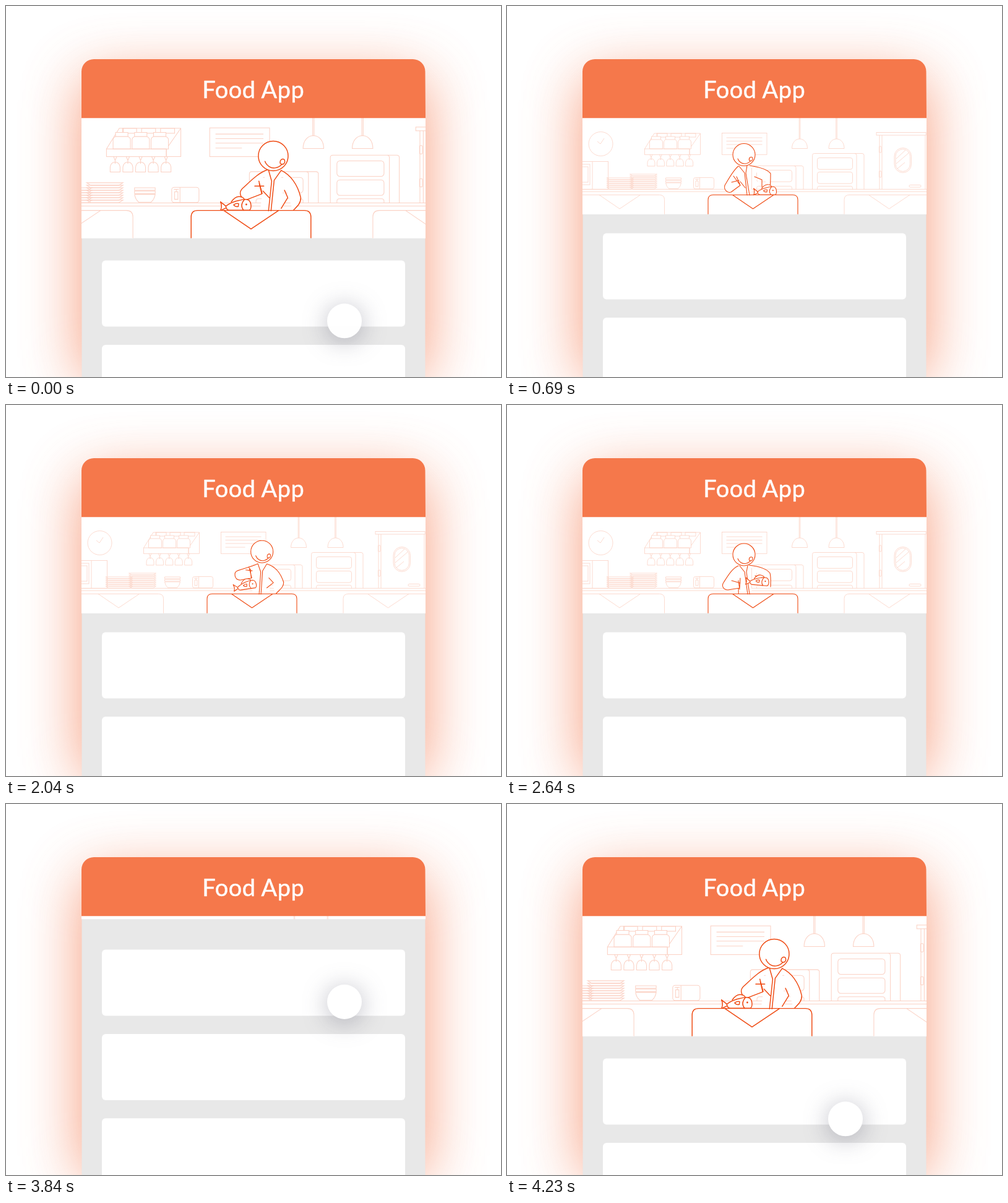
Recreate the animation shown at these times as an HTML page. Size 800 by 600 pixels, loop 4530 ms.

```html
<!DOCTYPE html>
<html lang="en">
<head>
<meta charset="utf-8">
<title>Food App</title>
<style>
  html, body { margin: 0; width: 100%; height: 100%; overflow: hidden; background: #fff; }
  svg { display: block; width: 800px; height: 600px; overflow: hidden; }
  #touch { filter: drop-shadow(0 5px 20px rgba(60, 62, 85, .36)); }
  #back { fill: none; stroke: #fbd2c5; stroke-width: .8; }
  #front { fill: #fff; stroke: #ef4a12; stroke-width: 1.1; stroke-linejoin: round; stroke-linecap: round; }
  text { font: 37.8px Lato, "Open Sans", sans-serif; letter-spacing: .6px; text-anchor: middle;
    fill: #fff; stroke: #fff; stroke-width: .5; }
</style>
</head>
<body>
<svg viewBox="0 0 800 600">
  <filter id="blur" filterUnits="userSpaceOnUse" x="-200" y="-200" width="1200" height="1100" color-interpolation-filters="sRGB">
    <feGaussianBlur stdDeviation="48"/>
  </filter>
  <clipPath id="window"><rect id="hole" x="122" y="181" width="556" height="0"/></clipPath>
  <rect x="122.5" y="116" width="555" height="490" rx="20" fill="#f57042" opacity=".7" filter="url(#blur)"/>
  <rect x="122.5" y="120" width="555" height="500" fill="#e8e8e8"/>
  <g id="cards" fill="#fff"></g>
  <g clip-path="url(#window)">
    <rect x="122" y="181" width="556" height="220" fill="#fff"/>
    <g id="scene">
      <g id="back"></g>
      <g id="front">
        <path id="torso" stroke="none" d="M-9 16H9L13 66H-16Z"/>
        <path id="body"/>
        <g id="head">
          <circle r="18"/>
          <path fill="none" d="M-10 6.5C-8 12-3 15 2 14.5Q7 14 10 10.5M8.5 9C7.5 5 11 2.5 13.5 4.5C15 8 12.5 12 8.5 9"/>
        </g>
        <g id="fish">
          <path d="M-7-3Q-2-10 3-9.5Q8-9 9-6M-13.5 2L-20-3.3Q-17.5 2-20 7.5L-13 4"/>
          <path d="M-13.5 2C-8-2-2-4 3-5Q8-6.5 12-6C18-5 18 5 15 7H-9Q-13 7-13.5 2Z"/>
          <path fill="none" d="M9-6Q3 1 8 7M-4 .5Q-1-2 2-1L1.5 2.500Q-2 3-4 .5"/>
          <circle cx="11.3" cy="0" r=".5"/>
        </g>
        <path id="desk"/>
      </g>
    </g>
  </g>
  <path d="M122 181.3V106a20 20 0 0 1 20-20H657.5a20 20 0 0 1 20 20L678 181.3Z" fill="#f5784b"/>
  <text x="399.8" y="149">Food App</text>
  <circle id="touch" cx="547" r="28" fill="#fff"/>
</svg>
<script>
const $ = id => document.getElementById(id);
const LOOP = 4530, PITCH = 136.4, CHEF_CYCLE = 1080;

// Kitchen background
const range = (n, f) => Array.from({ length: n }, (_, i) => f(i)).join('');
const box = (x, y, w, h, r = 0) => `<rect x="${x}" y="${y}" width="${w}" height="${h}" rx="${r}"/>`;
const line = (d, fill = 'none') => `<path d="${d}" fill="${fill}"/>`;
const oven = (x, y, rows) =>
  line(`M${x} 296.4V${y + 3}q0-3 3-3h77.5q3 0 3 3V296.4M${x + 71.5} 296.4V${y + 3}q0-3-3-3`) +
  range(rows, i => box(x + 8, y + 7 + 23 * i, 57, 18.7, 3.5)) +
  line(`M${x + 8} 296.4v-2q0-3 3-3h51q3 0 3 3v2`);
const lamp = x => line(`M${x - .8} 120V215M${x + .8} 120V215M${x - 12.5} 230.5C${x - 12.5} 221 ${x - 7} 215 ${x} 215S${x + 12.5} 221 ${x + 12.5} 230.5Z`);
const plates = (x, n) => range(n, i => line(`M${x} ${293 - 3 * i}h44l-5 3h-34z`));
const jar = x => line(`M${x} 231v-11q0-3 3-4v-5h15v5q3 1 3 4v11zM${x + 3} 216h15`, '#fff');
const glass = x => line(`M${x + 4} 240l2 5v4M${x + 8} 240l-2 5M${x} 259v-6q1-6 6-6t6 6v6z`);
const table = (x, y) => `M${x} 345V${y + 8}q0-8 8-8h129q8 0 8 8V345M${x + 39.5} ${y}l33 22.5 33.5-22.5`;

$('back').innerHTML =
  '<circle cx="151.5" cy="223" r="19.5"/>' + line('M146 219l5 4 6-9') +
  box(110, 251.5, 53.5, 45) + box(110, 256, 24, 33) + box(110, 260, 21, 25) + line('M138 251.5V296') +
  line('M222.5 231L238 206H312.5V240.3H295V231L312.5 206M243 211v-5M302 206') +
  range(3, i => box(242 + 23 * i, 206, 17, 6)) + range(3, i => jar(230.5 + 23 * i)) +
  box(222.5, 231, 72.5, 9.3) + range(5, i => glass(227 + 15.4 * i)) +
  box(347.5, 205.5, 72.5, 34.8) + line('M354.5 213h58M354.5 218.5h58M354.5 224h58M354.5 230h32') +
  plates(161, 6) + plates(198.5, 8) +
  line('M256.5 278h25v3h-25zM256.5 282h25v3h-25zM256.5 286h25q-1 6-5 9.5h-15q-4-3.5-5-9.5') +
  box(301.5, 277.5, 33, 18.3, 3) + line('M311.5 277.5v18M305 283h4v9h-4zM307 283v-3M304 280h6') +
  lamp(473) + lamp(532.5) + oven(395.5, 258.5, 1) + oven(493.5, 238.5, 2) +
  box(597, 204.5, 80, 4.5) + line('M602 209V296M606 209V296M676 209V296') +
  box(601.5, 227, 3.5, 10, 1) + box(601.5, 267, 3.5, 10, 1) +
  box(626, 229.5, 27.5, 40, 13.7) + box(628, 231.5, 23.5, 36, 11.7) + line('M629 247l15-14M629 255l21-18M631 263l12-10') +
  box(650, 289.5, 19, 3.5, 1.7) + line('M60 296.4H740M60 300.2H740') +
  line(table(109.5, 305.5) + table(545, 305.5), '#fff');

// Chef poses: head x y, fish x y angle | outline
const RIGHT = `424.4 239.5 380.5 298.3 0 |
  M418 256 C406 260 397 270 387 279 C382 284 385 291 391 293 L410.5 285.5 L407.5 273
  M418.5 256 L422.5 270 L418.7 306 M434 257 L425.5 269 L421.7 306
  M434 257 C445 262 454 274 457.7 290 C458 297 453 301 448 306
  M438 281 L442 290 L434 303 M402 276 L413 276 M407 270 L411 285 M412 282 L419.5 290`;
const MIDDLE = `408 236 391 287 -13 |
  M401 257 C392 262 380 261 368 262 C359 264 361 278 371 278 L389 277 L388 261
  M401 257 L406 270 L404 306 M415 257 L409 268 L407 306
  M415 257 C432 261 440 275 444 285 C444 293 438 296 429 306
  M418 279 L427 286 L415 292 M380 262 L390 264 M385 257 L390 277 M379 305 L379 295`;
const LANDING = `383 242 406 284 5 |
  M374 260 C364 264 357 276 350 287 C346 293 350 299 357 299 L376 296 L377 280
  M376 260 L384 270 L389 306 M389 260 L387 270 L392 306
  M391 259 C408 261 420 265 425 272 C427 280 426 288 426 294
  M401 276 L413 281 L412 292 M363 284 L377 288 M374 284 L376 298 M374 297 L374 305`;
const LEFT = `383 240.5 418.5 298.3 0 |
  M374 259 C366 265 358 280 352 290 C350 297 356 303 362 301 L377 290 L371 276
  M375 259 L384 270 L388 306 M388 258 L386 270 L392 306
  M392 258 C405 260 421 264 426 271 C426 280 426 288 425 291
  M400 276 L412 281 L412 293 M363 285 L375 282 M366 275 L377 290 M377 284 L385 294`;
const KEYS = [[0, RIGHT], [300, RIGHT], [390, MIDDLE], [480, LANDING], [560, LEFT],
  [840, LEFT], [930, MIDDLE], [1020, RIGHT], [CHEF_CYCLE, RIGHT]];

const NUMBER = /-?[\d.]+/g;
const lerp = (a, b, k) => a + (b - a) * k;
const ease = k => k < .5 ? 4 * k ** 3 : 1 - 4 * (1 - k) ** 3;
const part = (t, from, to) => Math.min(1, Math.max(0, (t - from) / (to - from)));
const phase = (t, from, to) => ease(part(t, from, to));
const mix = (a, b, k) => {
  const goal = b.match(NUMBER);
  let i = 0;
  return a.replace(NUMBER, v => lerp(+v, +goal[i++], k).toFixed(2));
};
const move = (id, value) => $(id).setAttribute('transform', value);

$('cards').innerHTML = range(5, () => box(-245, -53.5, 490, 107, 6));
const cards = [...$('cards').children];

function drawChef(t) {
  const now = Math.min(t, 3 * CHEF_CYCLE) % CHEF_CYCLE;
  const i = KEYS.findIndex(key => key[0] > now);
  const [from, a] = KEYS[i - 1], [to, b] = KEYS[i];
  const [spots, outline] = mix(a, b, part(now, from, to)).split('|');
  const [hx, hy, fx, fy, angle] = spots.trim().split(' ').map(Number);
  const beat = now % (CHEF_CYCLE / 2);
  const bob = beat < 300 ? 1.5 * Math.sin(Math.PI * beat / 150) ** 2 : 0;
  const dip = 2 * Math.sin(Math.PI * part(beat, 10, 150));
  $('body').setAttribute('d', outline);
  move('body', `translate(0 ${bob})`);
  move('torso', `translate(${hx} ${hy + bob})`);
  move('head', `translate(${hx} ${hy + bob})`);
  move('fish', `translate(${fx} ${fy + dip}) rotate(${angle})`);
  $('desk').setAttribute('d', table(325, 305.5 + dip));
}

function draw(t) {
  let bottom, top, scale, shift = 0, grow = 0;
  if (t < 3600) {
    const settle = phase(t, 0, 480), close = phase(t, 2968, 3390);
    bottom = lerp(lerp(375.6, 336.7, settle), 181, close);
    top = lerp(lerp(411.5, 367.5, settle), 346.4, close);
    scale = lerp(1.335, 1, settle);
    shift = -26 * close;
    grow = phase(t, 3036, 3390);
  } else {
    const pull = phase(t, 3750, 4230);
    bottom = lerp(181, 375.6, pull);
    top = lerp(210, 411.5, phase(t, 3661, 4230));
    scale = lerp(.89, 1.335, pull);
  }
  $('hole').setAttribute('height', bottom - 181);
  move('scene', `translate(402 ${230.5 + shift}) scale(${scale}) translate(-402 -230.5)`);
  cards.forEach((card, i) => {
    const fresh = i === 0;
    const y = fresh ? 263.5 - 4.75 * (1 - grow) : top + 53.5 + PITCH * (i - 1);
    card.setAttribute('transform', `translate(400 ${y}) scale(${fresh ? grow : 1})`);
  });
  $('touch').setAttribute('cy', t < 3600 ? 509.3 : bottom + 133.7);
  $('touch').style.opacity = t < 3600 ? 1 - part(t, 0, 270) : part(t, 3600, 3720);
  drawChef(t);
}

function tick() {
  draw(performance.now() % LOOP);
  requestAnimationFrame(tick);
}
tick();
</script>
</body>
</html>
```
